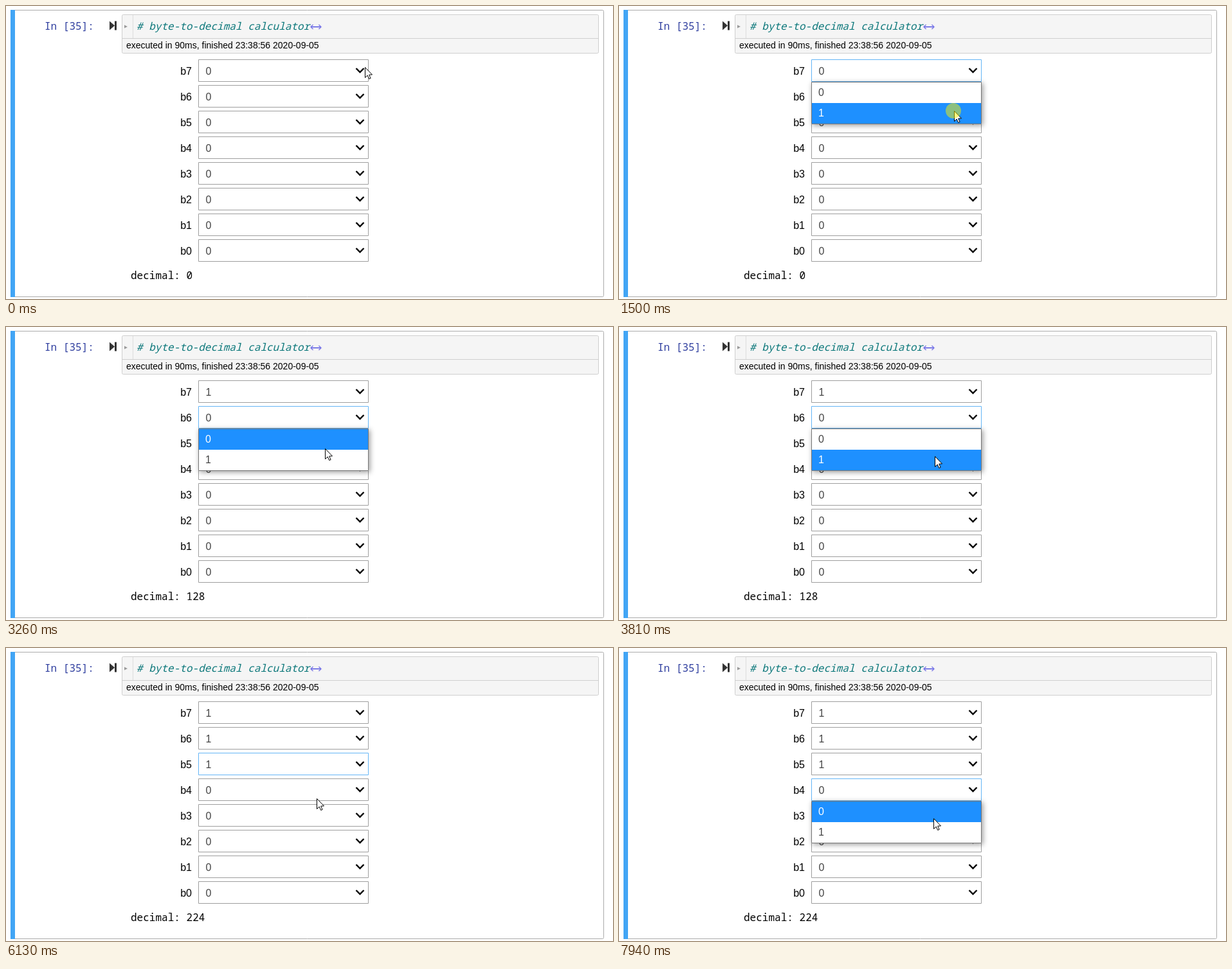
An HTML page with a canvas that plays this animation: 944x456 px, repeating every 8 s.

```html
<!DOCTYPE html>
<html lang="en">
<head>
<meta charset="utf-8">
<title>Byte to decimal</title>
<style>
html, body { margin: 0; width: 100%; height: 100%; overflow: hidden; background: #fff; }
canvas { display: block; }
</style>
</head>
<body>
<canvas id="stage" width="944" height="456"></canvas>
<script>
const ctx = document.getElementById('stage').getContext('2d');
const LOOP = 8000;
const SANS = '"Liberation Sans", Arial, sans-serif';
const MONO = '16.05px "Noto Sans Mono", monospace';
const LABEL = '16px ' + SANS;

// Each row in turn: menu opens, menu closes with 1 picked, where the pointer clicks
const start = { x: 558, y: 95 };
const rounds = [
  { open: 410, pick: 1730, click: { x: 541, y: 92 }, choose: { x: 521, y: 163 } },
  { open: 2730, pick: 3900, click: { x: 515, y: 136 }, choose: { x: 491, y: 201 } },
  { open: 5060, pick: 5900, click: { x: 495, y: 171 }, choose: { x: 483, y: 234 } },
  { open: 7300, pick: 8250, click: { x: 489, y: 223 }, choose: { x: 489, y: 265 } }
];

const rowTop = i => 83 + 40 * i;

// Ease-out progress from one time to another
function progress(t, from, to) {
  const k = Math.min(1, Math.max(0, (t - from) / (to - from)));
  return 1 - (1 - k) ** 3;
}

const mix = (a, b, k) => ({ x: a.x + (b.x - a.x) * k, y: a.y + (b.y - a.y) * k });

function pointerAt(t) {
  let p = start;
  for (const { open, pick, click, choose } of rounds) {
    p = mix(p, click, progress(t, open - 410, open - 250));
    p = mix(p, choose, progress(t, open + 290, pick - 310));
  }
  return { x: Math.round(p.x), y: Math.round(p.y) };
}

function isPressed(t) {
  return rounds.some(({ open, pick }) =>
    (t >= open - 80 && t < open) || (t >= pick - 240 && t < pick - 92));
}

function text(str, x, y, font, color, align = 'left') {
  ctx.font = font;
  ctx.fillStyle = color;
  ctx.textAlign = align;
  ctx.fillText(str, x, y);
}

function rect(x, y, w, h, color) {
  ctx.fillStyle = color;
  ctx.fillRect(x, y, w, h);
}

function box(x, y, w, h, color, line, radius = 0) {
  ctx.beginPath();
  ctx.roundRect(x + 0.5, y + 0.5, w - 1, h - 1, radius);
  ctx.fillStyle = color;
  ctx.fill();
  ctx.strokeStyle = line;
  ctx.lineWidth = 1;
  ctx.stroke();
}

function path(points, closed) {
  ctx.beginPath();
  points.forEach(([x, y]) => ctx.lineTo(x, y));
  if (closed) ctx.closePath();
}

function stroke(points, color, width) {
  path(points);
  ctx.strokeStyle = color;
  ctx.lineWidth = width;
  ctx.stroke();
}

function fill(points, color) {
  path(points, true);
  ctx.fillStyle = color;
  ctx.fill();
}

function drawFoldMark(cx, cy) {
  ctx.save();
  ctx.shadowColor = '#b9f';
  ctx.shadowBlur = 2;
  const color = '#2a38d8';
  stroke([[cx - 7, cy], [cx + 7, cy]], color, 1);
  for (const side of [-1, 1]) {
    const tip = cx + 8 * side, back = cx + 4.5 * side;
    stroke([[back, cy - 3.5], [tip, cy], [back, cy + 3.5]], color, 1);
  }
  ctx.restore();
}

function drawCell() {
  rect(0, 0, 944, 456, '#fff');
  box(7, 6, 923, 447, '#fff', '#ababab', 2);
  rect(7, 6, 7, 447, '#42a5f5');

  text('In [35]:', 60, 37, MONO, '#303f9f');
  fill([[161, 23.5], [169, 30.5], [161, 37.5]], '#333');
  rect(169, 23.5, 3, 14, '#333');

  box(180, 13, 742, 61, '#f5f5f5', '#cfcfcf', 2);
  rect(197, 14, 1, 36, '#ddd');
  rect(181, 50, 740, 1, '#cfcfcf');
  fill([[184, 29.5], [189, 32], [184, 34.5]], '#999');
  text('# byte-to-decimal calculator', 203, 37, 'italic ' + MONO, '#0d787b');
  drawFoldMark(482, 32.5);
  text('executed in 90ms, finished 23:38:56 2020-09-05', 187, 66, '14px ' + SANS, '#000');
}

function drawSelect(i, value, focused) {
  const y = rowTop(i);
  text('b' + (7 - i), 289, y + 24, LABEL, '#000', 'right');
  box(299, y, 265, 35, '#fff', focused ? '#64b5f6' : '#9e9e9e');
  text(value, 310.5, y + 24, LABEL, '#444');
  stroke([[544.5, y + 14], [550.5, y + 20], [556.5, y + 14]], '#000', 2.4);
}

function drawMenu(i, pointerY) {
  const y = rowTop(i) + 35;
  const hot = pointerY >= y + 33 ? 1 : 0;
  ctx.save();
  ctx.shadowColor = 'rgba(0,0,0,0.4)';
  ctx.shadowBlur = 8;
  ctx.shadowOffsetX = ctx.shadowOffsetY = 2;
  rect(299, y, 265, 66, '#fff');
  ctx.restore();
  box(299, y, 265, 66, '#fff', '#767676');
  rect(300, y + 1 + 32 * hot, 263, 32, '#1e90ff');
  for (const n of [0, 1]) {
    text(n, 310, y + 22 + 32 * n, LABEL, n === hot ? '#fff' : '#444');
  }
}

function drawPointer({ x, y }, pressed) {
  ctx.save();
  ctx.translate(x + 0.5, y + 0.5);
  fill([[0, 0], [0, 16], [3.7, 12.5], [6.2, 18], [8.6, 17], [6.2, 11.6], [11, 11.4]], '#fff');
  ctx.strokeStyle = '#000';
  ctx.lineWidth = 1;
  ctx.stroke();
  ctx.restore();
  if (pressed) {
    ctx.beginPath();
    ctx.arc(x - 1, y, 12, 0, 2 * Math.PI);
    ctx.fillStyle = 'rgba(250,240,0,0.5)';
    ctx.fill();
  }
}

function draw(t) {
  const pointer = pointerAt(t);
  const focus = rounds.filter(r => t >= r.open).length - 1;
  let total = 0;
  drawCell();
  for (let i = 0; i < 8; i++) {
    const bit = t >= rounds[i]?.pick ? 1 : 0;
    total += bit << (7 - i);
    drawSelect(i, bit, i === focus);
  }
  text('decimal: ' + total, 194, 425, MONO, '#000');
  if (t < rounds[focus]?.pick) drawMenu(focus, pointer.y);
  drawPointer(pointer, isPressed(t));
}

const began = performance.now();
function tick() {
  draw((performance.now() - began) % LOOP);
  requestAnimationFrame(tick);
}
tick();
</script>
</body>
</html>
```
